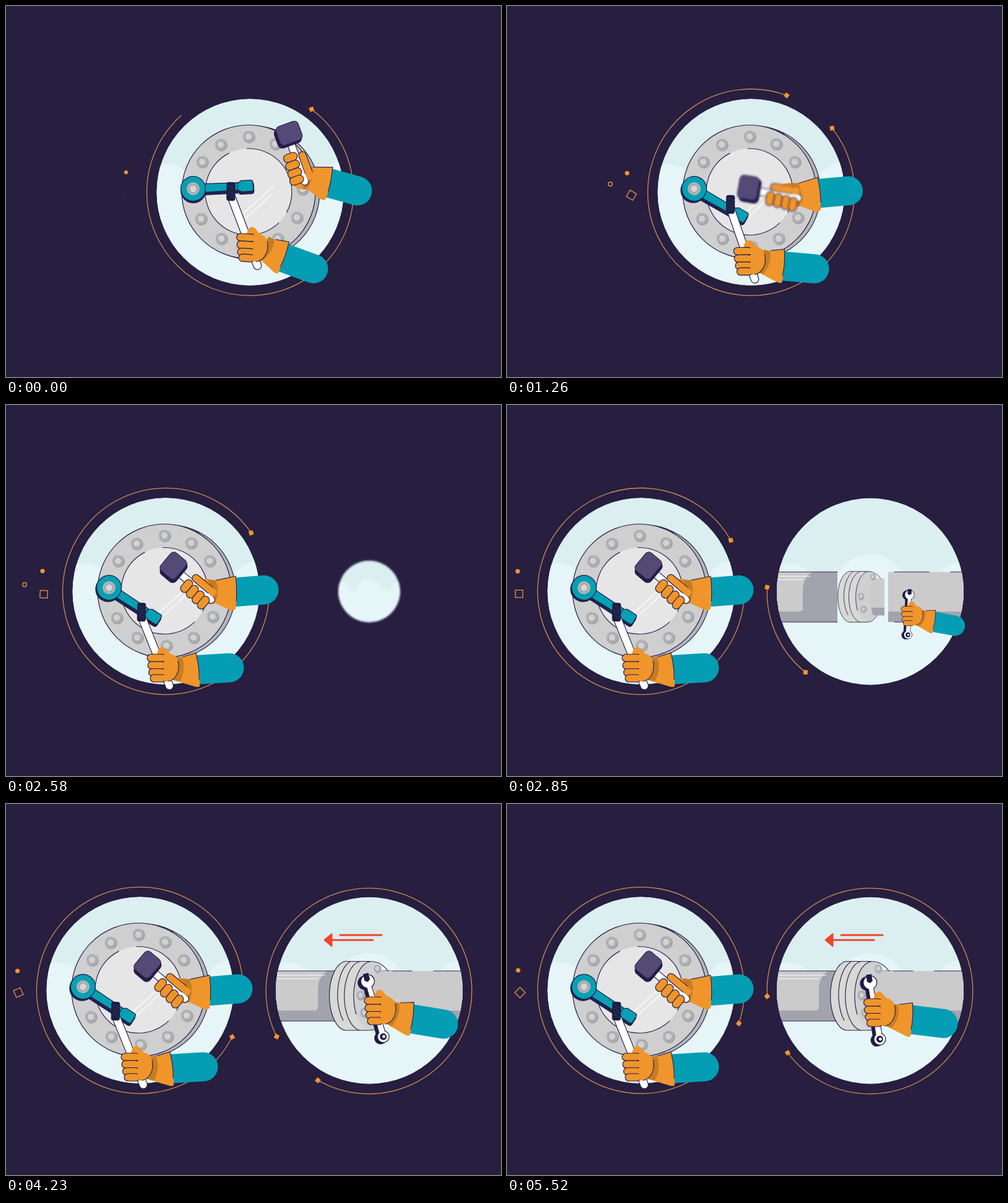
These frames come from a looping animation (800 px wide and 600 px high, 5.55 s). An HTML page:

```html
<!DOCTYPE html>
<html lang="en">
<head>
<meta charset="utf-8">
<title>Flange work</title>
<style>
  html, body { margin: 0; width: 100%; height: 100%; overflow: hidden; background: #271e40; }
  svg { display: block; width: 800px; height: 600px; }
  .ln { fill: none; stroke: #2b2550; stroke-width: 1.2; stroke-linecap: round; }
  .ol { stroke: #231d48; stroke-width: 1.2; }
  .glove { fill: #f0952b; }
  .shade { fill: #c47d22; }
  .sleeve { stroke: #049db3; stroke-width: 47; stroke-linecap: round; }
  .ring { fill: none; stroke: #cf8d52; stroke-width: 1.3; }
  .mark { fill: #f0952b; }
  .thin { fill: none; stroke: #e0903f; stroke-width: 1.4; }
  .red { fill: none; stroke: #f0432b; stroke-width: 3; stroke-linecap: round; }
</style>
</head>
<body>
<svg viewBox="0 0 800 600">
  <defs>
    <clipPath id="round"><circle r="151"/></clipPath>
    <clipPath id="window"><circle cx="587" cy="301.5" r="151"/></clipPath>
    <g id="sky" clip-path="url(#round)">
      <circle r="151" fill="#dbeff0"/>
      <g fill="#e6f6f8">
        <rect x="-151" y="-4" width="302" height="160"/>
        <circle cx="-132" r="45"/><circle r="60"/><circle cx="150" cy="-4" r="45"/>
      </g>
    </g>
    <g id="bolt">
      <circle cx="1" cy="1" r="10" fill="#a3a5a8"/>
      <circle cx="-.5" cy="-.5" r="9" fill="#b3b5b7"/>
      <path d="M-6.5 0L-3.2 -5.8H3.2L6.5 0L3.2 5.8H-3.2Z" fill="#d0d1d2" stroke="#939599"/>
    </g>
    <g id="cuff">
      <path class="glove" d="M-8 -18L2 -18L25 -25Q32 2 31 29Q28 31 22 29L-8 20Z"/>
      <path class="shade" d="M-8 -18L2 -18Q10 0 -1 21L-12 19Z"/>
      <path class="ln" d="M4 -19L25 -25Q31 0 30 18"/>
    </g>
    <g id="fist">
      <path class="glove" d="M-10 -16C-10 -26 -5 -32 1 -30C7 -27 7 -21 14 -19C23 -16 26 -8 25 2C25 15 18 25 6 25H-10Z"/>
      <path class="ln" d="M24 -8C28 8 20 23 8 25"/>
      <g id="knuckles"></g>
      <path class="glove" d="M1 -18H10V24H1Z"/>
    </g>
    <g id="spannerShape">
      <path d="M-4 -40H4L5 40H-5Z"/>
      <circle cy="-46" r="11"/>
      <circle cy="47" r="9.5"/>
    </g>
  </defs>

  <g id="left">
    <path id="ringL" class="ring"/>
    <rect id="markA" class="mark" x="-3.5" y="-3.5" width="7" height="7"/>
    <rect id="markB" class="mark" x="-3.5" y="-3.5" width="7" height="7"/>
    <circle id="dot" class="mark" r="3.6"/>
    <circle id="hoop" class="thin" r="3.3"/>
    <rect id="box" class="thin" x="-6" y="-6" width="12" height="12"/>

    <use href="#sky" x="394.5" y="301"/>
    <circle cx="398.5" cy="302" r="108.3" fill="#b5b6ba" class="ol"/>
    <path d="M430 199L448 207" class="ln"/>
    <circle cx="392" cy="300.5" r="108" fill="#cfcfd0" class="ol"/>
    <circle cx="392" cy="300.5" r="70" fill="#e6e6e7"/>
    <path id="rim1" class="ln"/><path id="rim2" class="ln"/>
    <path d="M381 338L433 291M387 344L428 306" stroke="#fff" stroke-width="1.3"/>
    <g id="bolts"></g>

    <g id="wrench">
      <g fill="#1d2550" class="ol" transform="translate(0 3)">
        <path d="M15 -6L72 -4V8L15 8Z"/><circle r="20"/>
        <rect x="73" y="-9" width="25" height="19" rx="4"/>
      </g>
      <g fill="#05a0b4" class="ol">
        <path d="M15 -7L74 -6V6L15 7Z"/><circle r="20"/>
        <path d="M72 -5L78 -9H93Q97 -9 97 -5V5Q97 9 93 9H78L72 6Z"/>
      </g>
      <circle r="10.5" fill="#b0b2b5"/>
      <path d="M-6.5 0L-3.2 -5.8H3.2L6.5 0L3.2 5.8H-3.2Z" fill="#d6d7d8" stroke="#939599"/>
    </g>

    <line id="sleeveL" class="sleeve"/>
    <line id="barEdge" stroke="#231d48" stroke-width="14" stroke-linecap="round"/>
    <line id="bar" stroke="#fff" stroke-width="11.6" stroke-linecap="round"/>
    <g id="clamp">
      <rect x="-6.5" y="-14.5" width="13" height="29" rx="3" fill="#1b1f43" class="ol"/>
      <path d="M-5 -10L5 -6M-5 -5L5 -1M-5 0L5 4M-5 5L5 9" stroke="#303c66" stroke-width="1"/>
    </g>
    <use id="cuffL" href="#cuff"/>
    <use id="fistL" href="#fist"/>

    <line id="sleeveH" class="sleeve"/>
    <g id="cuffH">
      <path class="glove" d="M-64 -14C-56 -23 -44 -20 -32 -19L0 -26Q4 0 1 27Q-3 31 -10 28L-32 18C-44 22 -54 20 -58 14Z"/>
      <path class="shade" d="M-46 -20L-32 -19Q-24 0 -33 18L-40 19Q-32 0 -46 -20Z"/>
      <path class="ln" d="M-31 -19L0 -26Q3 -6 2 14"/>
    </g>
    <g id="hammer">
      <rect x="-50" y="-6" width="76" height="12" rx="6" fill="#fff" class="ol"/>
      <rect x="-75" y="-20" width="33" height="41" rx="8" fill="#231d48"/>
      <rect x="-78" y="-22" width="32" height="38" rx="7" fill="#554a76" stroke="#231d48"/>
      <g id="fingers"></g>
      <rect class="glove ol" x="-27" y="-17" width="40" height="12" rx="6"/>
      <path class="glove" d="M-8 -16.4H20V-5.6H-8Z"/>
    </g>
  </g>

  <g id="right">
    <path id="ringR" class="ring"/>
    <rect id="markC" class="mark" x="-3.5" y="-3.5" width="7" height="7"/>
    <rect id="markD" class="mark" x="-3.5" y="-3.5" width="7" height="7"/>
    <g id="disc"><use href="#sky"/></g>
    <g clip-path="url(#window)">
      <g id="pipeL">
        <rect x="430" y="270" width="130" height="81" fill="#a3a3ad"/>
        <path d="M430 270H519Q504 280 504 300V328Q504 334 498 334H430Z" fill="#cbcbcc"/>
        <path d="M430 277H516M430 282.500H504" stroke="#fff" stroke-width="1.2"/>
        <path d="M430 270H560M430 351H560" class="ln"/>
      </g>
      <g id="pipeR">
        <rect x="590" y="270" width="155" height="81" fill="#cbcbcc"/>
        <rect x="590" y="334" width="155" height="17" fill="#a3a3ad"/>
        <path d="M600 270H656M691 270H745M600 351H745" class="ln"/>
      </g>
      <g id="flange">
        <path d="M548 254.500H588A28 56 0 0 1 588 366H548A28 56 0 0 1 548 254.500Z" fill="#d8d9d5"/>
        <ellipse cx="589" cy="310" rx="27" ry="55" fill="#cfd0d0"/>
        <path d="M598 270H625V351H598Q588 310 598 270Z" fill="#cbcbcc"/>
        <path d="M596 334H625V351H600Z" fill="#a3a3ad"/>
        <path d="M617 270Q606 254.500 588 254.500H548A28 56 0 0 0 548 366H588Q600 366 609 351" class="ln"/>
        <path d="M556 255A28 56 0 0 0 545 350M571 255A28 56 0 0 0 571 366M588 255A28 56 0 0 0 566 340" class="ln"/>
        <use href="#bolt" transform="translate(600 266) scale(.6 .7)"/>
        <use href="#bolt" transform="translate(573 309) scale(.7 .8)"/>
        <use href="#bolt" transform="translate(579 337) scale(.7 .8)"/>
      </g>
    </g>
    <g id="arrow">
      <line id="dash1" class="red" x1="607" y1="212" y2="212"/>
      <line id="dash2" class="red" x1="593" y1="220" y2="220"/>
      <path id="tip" d="M-6 0L6 -10V10Z" fill="#f0432b" stroke="#f0432b" stroke-width="2" stroke-linejoin="round"/>
    </g>
    <g id="armR">
      <line id="sleeveR" class="sleeve"/>
      <g id="spanner">
        <use href="#spannerShape" x="-5" y="1" fill="#1d1c44" class="ol"/>
        <use href="#spannerShape" fill="#fff" class="ol"/>
        <path d="M-3.300 -39H3.300L4.300 40H-4.300Z" fill="#fff"/>
        <path d="M-4.500 -59H4.500V-48L0 -45L-4.500 -48Z" fill="#1d1c44"/>
        <circle cy="47" r="5.500" fill="#1d1c44"/><circle cx="1" cy="47" r="2.500" fill="#fff"/>
      </g>
      <use id="cuffR" href="#cuff"/>
      <use id="fistR" href="#fist"/>
    </g>
  </g>
</svg>
<script>
const LOOP = 5550;
const $ = id => document.getElementById(id);
const set = (id, attrs) => { for (const k in attrs) $(id).setAttribute(k, attrs[k]); };
const place = (id, x, y, rot = 0, s = 1) =>
  set(id, { transform: `translate(${x} ${y}) rotate(${rot}) scale(${s})` });
const span = (t, a, b) => Math.min(1, Math.max(0, (t - a) / (b - a)));
const out = u => 1 - (1 - u) ** 3;
const inOut = u => u < .5 ? 4 * u ** 3 : 1 - 4 * (1 - u) ** 3;
const smooth = u => u * u * (3 - 2 * u);
const mix = (p, q, u) => p.map((v, i) => v + (q[i] - v) * u);

// rows: [time, ...values]
function keys(t, rows, ease = u => u) {
  let i = 0;
  while (i < rows.length - 2 && t >= rows[i + 1][0]) i++;
  const [a, b] = [rows[i], rows[i + 1]];
  return mix(a, b, ease(span(t, a[0], b[0]))).slice(1);
}
function polar(cx, cy, r, deg) {
  const a = deg * Math.PI / 180;
  return [cx + r * Math.cos(a), cy + r * Math.sin(a)];
}
function arc(cx, cy, r, from, len) {
  if (len < .1) return 'M0 0';
  return `M${polar(cx, cy, r, from)}A${r} ${r} 0 ${len > 180 ? 1 : 0} 1 ${polar(cx, cy, r, from + len)}`;
}
const line = (id, [x1, y1], [x2, y2]) => set(id, { x1, y1, x2, y2 });

// Fixed parts
$('bolts').innerHTML = [[392, 211], [347, 224], [317, 252], [315, 344], [348, 376], [395, 389],
  [439, 376], [470, 342], [479, 296], [465, 252], [435, 223]]
  .map(([x, y]) => `<use href="#bolt" x="${x}" y="${y}"/>`).join('');
$('knuckles').innerHTML = [[-26, 20], [-24, 8], [-23, -4], [-26, -19]].reverse()
  .map(([x, y], i) => {
    const py = [-19, -7, 4.5, 14][i], px = [-26, -25, -23.5, -21][i];
    return `<rect class="glove ol" x="${px}" y="${py}" width="${4 - px}" height="12" rx="6"/>`;
  }).join('');
$('fingers').innerHTML = [-31, -18, -5, 7]
  .map((x, i) => `<rect class="glove ol" x="${x}" y="${-3 + i}" width="13" height="23" rx="6.3"/>`).join('');
set('rim1', { d: arc(392, 300.5, 70, -92, 120) });
set('rim2', { d: arc(392, 300.5, 70, 46, 197) });

// Hammer pose: angle, grip x y, cuff x y angle, elbow x y
const RAISED = [70, 476, 265, 522, 286, 13, 568, 299];
const TOP = [55, 455, 259, 501, 279, 22, 555, 298];
const HIT = [2.5, 450, 315, 504.5, 307, -8.5, 551, 299];
const REST = [40, 452, 302, 506.5, 303, 1, 553, 299];
const FIRST = 285, BEAT = 495, LAST = 1770, LIFT = 300;

function hammerPose(t) {
  if (t < FIRST) return mix(RAISED, HIT, span(t, 0, FIRST) ** 2);
  if (t >= LAST) return mix(HIT, REST, smooth(span(t, LAST + 20, 2120)));
  const p = (t - FIRST) % BEAT;
  return p < LIFT ? mix(HIT, TOP, smooth(p / LIFT)) : mix(TOP, HIT, ((p - LIFT) / (BEAT - LIFT)) ** 2);
}

function drawHammer(t) {
  const [ang, gx, gy, cx, cy, cr, ex, ey] = hammerPose(t);
  place('hammer', gx, gy, ang);
  place('cuffH', cx, cy, cr);
  line('sleeveH', polar(cx, cy, -3, cr), [ex, ey]);
  const speed = t > 30 && t < 2120 ? Math.abs(ang - hammerPose(t - 15)[0]) : 0;
  $('hammer').style.filter = speed > 2.5 ? `blur(${Math.min(1.6, speed * .28)}px)` : 'none';
}

function drawWrench(t) {
  const u = inOut(span(t, 0, 1760));
  place('wrench', 302.5, 295.5, -3 + 36 * u);
  const [kx, ky, bx, by, fx, fy, fr, wx, wy, wr] = keys(t, [
    [0, 363.5, 300, 406.5, 420, 398, 388, 3, 424, 393, 26],
    [720, 368, 305, 401, 428, 395, 395, -1, 420.5, 399, 23],
    [1760, 355, 335, 400, 454, 390, 422, 0, 418, 426, 0]], smooth);
  place('clamp', kx, ky, 1);
  line('barEdge', [kx + 2, ky + 12], [bx, by]);
  line('bar', [kx + 2, ky + 12], [bx, by]);
  place('cuffL', wx, wy, wr);
  place('fistL', fx, fy, fr);
  line('sleeveL', polar(wx, wy, 29, wr + 4), [497, 425]);
}

function drawLeftRing(t) {
  const [end] = keys(t, [[0, -85], [2250, -58], [2580, -34.5], [LOOP, 19.2]]);
  const start = end + 31.5, c = [394.5, 301.3, 167];
  const tail = end - 47 * (1 - span(t, 0, 520)) ** 3;
  set('ringL', { d: arc(...c, start, 360 + tail - start) });
  place('markA', ...polar(...c, tail), tail + 105, out(span(t, 120, 400)));
  place('markB', ...polar(...c, start), start + 32);
}

function drawBits(t) {
  const [dx, dy, hx, hy, bx, by, br] = keys(t, [
    [0, 194, 269, 165, 293, 191, 307, 60],
    [720, 192.5, 270, 167.5, 288, 201, 307, 36],
    [1770, 195.5, 270.5, 166.5, 288, 201, 305, 25],
    [2580, 195, 268.5, 166, 290.5, 197, 306, 3],
    [3390, 196, 270, 167, 288, 199, 303.5, -8],
    [4230, 196.5, 270, 167, 288, 198, 305, -24],
    [LOOP, 196, 269, 167, 288, 199, 305, -45]], smooth);
  const grow = out(span(t, -20, 450));
  place('dot', dx, dy, 0, .85 + .15 * grow);
  place('hoop', hx, hy, 0, grow);
  place('box', bx, by, br, grow);
}

function drawRight(t) {
  $('right').style.display = t < 2385 ? 'none' : '';
  const u = span(t, 2385, 2835);
  place('disc', 587, 301.5, 0, inOut(u));
  $('disc').style.filter = u < 1 ? `blur(${4.5 * Math.sin(Math.PI * u)}px)` : 'none';

  const c = [586.5, 302.5, 166.3], start = 138.5 + .0181 * (t - 3390);
  const len = 326 * inOut(span(t, 2640, 3250));
  set('ringR', { d: arc(...c, start, len) });
  place('markC', ...polar(...c, start), start + 55, out(span(t, 2640, 2800)));
  place('markD', ...polar(...c, start + len), start + len + 10, out(span(t, 2700, 2900)));

  const slide = 180 * (1 - out(span(t, 2680, 3040)));
  place('pipeL', -slide, 0);
  place('pipeR', slide, 0);
  const pop = out(span(t, 2740, 3050));
  set('flange', { transform: `translate(568 310) scale(${pop}) translate(-568 -310)` });

  const [px, py, tilt, wr, ex, ey] = keys(t, [
    [2700, 602, 331, 4, 14.5, 709, 357],
    [3390, 600, 331, -10.5, 14.5, 708, 357],
    [4230, 597, 331, -15.8, 13.7, 707, 356],
    [5520, 594.5, 334, -9.7, 10, 705, 355]], smooth);
  const wrist = [px + 32, py + 8];
  place('spanner', px, py, tilt);
  place('cuffR', ...wrist, wr);
  place('fistR', px + 8, py);
  line('sleeveR', polar(...wrist, 28, wr + 4), [ex, ey]);
  const come = out(span(t, 2720, 3120));
  set('armR', { transform: `translate(${708 + 50 * (1 - come)} 357) scale(${come}) translate(-708 -357)` });

  $('arrow').style.display = t < 3480 ? 'none' : '';
  const reach = out(span(t, 3480, 3840));
  set('dash1', { x2: 607 - 67 * reach });
  set('dash2', { x2: 593 - 66 * reach });
  place('tip', 520.5, 220, 0, out(span(t, 3660, 3900)));
}

function frame() {
  const t = performance.now() % LOOP;
  place('left', -178 * inOut(span(t, 2280, 2773)), 0);
  drawLeftRing(t);
  drawBits(t);
  drawWrench(t);
  drawHammer(t);
  drawRight(t);
  requestAnimationFrame(frame);
}
frame();
</script>
</body>
</html>
```
